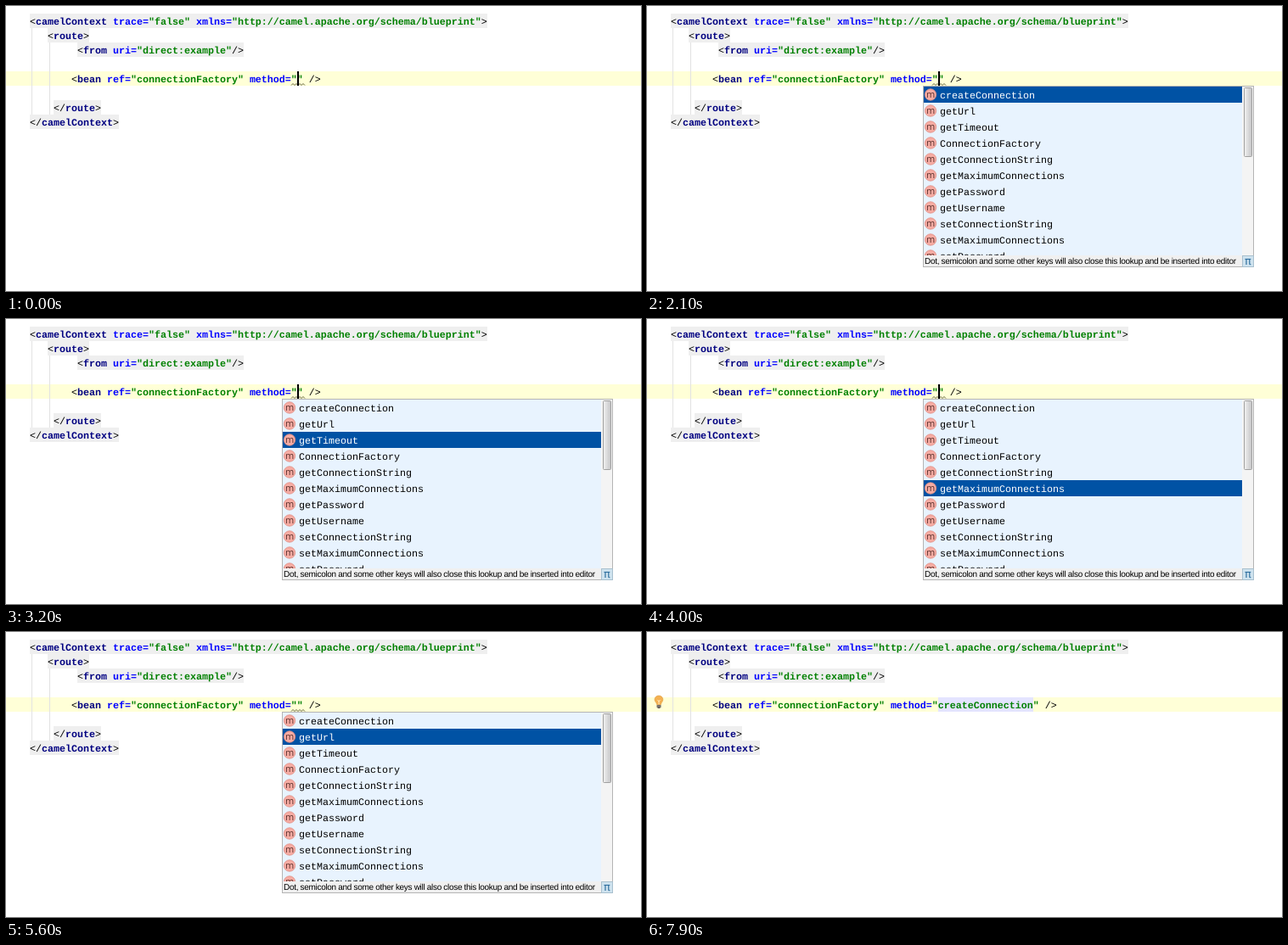
Recreate the animation shown at these times as an HTML page. Size 748 px wide and 336 px high, loop 8000 ms.

```html
<!DOCTYPE html>
<html lang="en">
<head>
<meta charset="utf-8">
<title>Method completion</title>
<style>
  html, body { margin: 0; width: 100%; height: 100%; overflow: hidden; background: #fff; }
  svg { display: block; width: 748px; height: 336px; }
  text { white-space: pre; text-rendering: geometricPrecision; }
  .code { font: 11.667px "Liberation Mono", monospace; }
  .tag { font-weight: bold; fill: #000080; }
  .attr { font-weight: bold; fill: #0000ff; }
  .val { font-weight: bold; fill: #008000; }
  .icon { font: 11px "Open Sans", sans-serif; fill: #5a2f2c; text-anchor: middle; }
  .hint { font: 10px "Liberation Sans", sans-serif; letter-spacing: -.31px; }
  .pi { font: 13px "DejaVu Sans", sans-serif; fill: #2f6f9f; text-anchor: middle; }
</style>
</head>
<body>
<svg id="stage" viewBox="0 0 748 336">
  <defs>
    <clipPath id="listClip"><rect x="326" y="95" width="375" height="199"/></clipPath>
    <linearGradient id="thumb"><stop stop-color="#f2f2f2"/><stop offset="1" stop-color="#c4c4c6"/></linearGradient>
  </defs>
</svg>
<script>
const LOOP = 8000, CHAR = 7, LINE = 17, ROW = 19;
const stage = document.getElementById('stage');

function add(parent, name, attrs = {}, content) {
  const el = document.createElementNS('http://www.w3.org/2000/svg', name);
  for (const key in attrs) el.setAttribute(key, attrs[key]);
  if (content !== undefined) el.textContent = content;
  parent.appendChild(el);
  return el;
}
const rect = (parent, x, y, width, height, fill, more) =>
  add(parent, 'rect', { x, y, width, height, fill, ...more });
const show = (el, on) => el.setAttribute('visibility', on ? 'inherit' : 'hidden');

function tokenClass(token) {
  if (token[0] === '"') return 'val';
  if (token.endsWith('=')) return 'attr';
  return /\w/.test(token) ? 'tag' : '';
}
function codeText(parent, x, row, source) {
  const text = add(parent, 'text', { class: 'code', x, y: 22 + LINE * row });
  for (const token of source.match(/"[^"]*"|\w+=|\w+|[^\w"]+/g))
    add(text, 'tspan', { class: tokenClass(token) }, token);
  return text;
}

// Editor
rect(stage, 0, 77, 748, LINE, '#ffffd7');
rect(stage, 30, 26, 1, 103, '#e2e2e2');
rect(stage, 51, 43, 1, 85, '#e2e2e2');
const lines = [
  [28, 0, '<camelContext trace="false" xmlns="http://camel.apache.org/schema/blueprint">'],
  [49, 1, '<route>'],
  [84, 2, '<from uri="direct:example"/>'],
  [56, 6, '</route>'],
  [28, 7, '</camelContext>']
];
for (const [x, row, source] of lines) {
  rect(stage, x, 9 + LINE * row, source.length * CHAR, LINE, '#efefef');
  codeText(stage, x, row, source);
}
const usage = rect(stage, 343, 77, 112, LINE, '#e4e4ff');
const bean = name => codeText(stage, 77, 4, `<bean ref="connectionFactory" method="${name}" />`);
const emptyBean = bean(''), filledBean = bean('createConnection');
const wave = add(stage, 'path', {
  d: 'M336 93.5' + 'l2 -2l2 2'.repeat(4), fill: 'none', stroke: '#66663c', 'stroke-width': 1
});
const caret = rect(stage, 343, 77, 2, LINE, '#000');

// Intention bulb
const bulb = add(stage, 'g');
add(bulb, 'path', {
  d: 'M11.5 85.5C11.5 83 9 82.500 9 79.500A4.900 4.500 0 0 1 18.800 79.500C18.800 82.500 16.500 83 16.500 85.500Z',
  fill: '#f4b152', stroke: '#dd9a3c', 'stroke-width': .6
});
add(bulb, 'path', { d: 'M12.500 80l1.500 2l1.500 -2M14 82v3', fill: 'none', stroke: '#fff0cc', 'stroke-width': .9 });
rect(bulb, 11.5, 86, 5, 3, '#77706a');
rect(bulb, 12.5, 89, 3, 1, '#55504c');

// Completion popup
const popup = add(stage, 'g');
rect(popup, 325.5, 94.5, 389, 213, '#f0f0f0', { stroke: '#b4b4b4' });
const list = add(popup, 'g', { 'clip-path': 'url(#listClip)' });
rect(list, 326, 95, 375, 199, '#e8f3fe');
const bar = rect(list, 326, 95, 375, ROW, '#0052a4');
const names = ['createConnection', 'getUrl', 'getTimeout', 'ConnectionFactory', 'getConnectionString',
  'getMaximumConnections', 'getPassword', 'getUsername', 'setConnectionString',
  'setMaximumConnections', 'setPassword'];
const items = names.map((name, i) => {
  const y = 104.5 + ROW * i;
  add(list, 'circle', { cx: 334, cy: y, r: 6.7, fill: '#f6aca3', stroke: '#e08d85', 'stroke-width': .8 });
  add(list, 'text', { class: 'icon', x: 334, y: y + 3.2 }, 'm');
  return add(list, 'text', { class: 'code', x: 345, y: y + 4.5 }, name);
});
rect(popup, 701, 95, 13, 199, '#f4f4f4');
rect(popup, 703.5, 96.5, 9, 81, 'url(#thumb)', { rx: 1, stroke: '#a0a0a0' });
add(popup, 'text', { class: 'hint', x: 327, y: 304 },
  'Dot, semicolon and some other keys will also close this lookup and be inserted into editor');
rect(popup, 701.5, 294.5, 13, 13, '#cfe3ef', { stroke: '#a9c0ce' });
add(popup, 'text', { class: 'pi', x: 708, y: 305 }, 'π');

// Timeline
const blinks = [500, 1000, 1700, 2100, 2500, 3000, 3500, 4000, 4500, 5000, 5600, 6000,
  6500, 6500, 7100, 7600, 7900];
const downs = [2700, 3000, 3400, 3700, 3800];
const ups = [4700, 5000, 5300, 5600, 5800];
const passed = (times, t) => times.filter(at => t >= at).length;

function draw(t) {
  const filled = t >= 6500;
  const selected = passed(downs, t) - passed(ups, t);
  show(popup, t >= 2100 && t < 6400);
  bar.setAttribute('y', 95 + ROW * selected);
  items.forEach((item, i) => item.setAttribute('fill', i === selected ? '#fff' : '#000'));
  show(emptyBean, !filled);
  show(wave, !filled);
  show(filledBean, filled);
  show(usage, t >= 7300);
  show(bulb, t >= 7600);
  caret.setAttribute('x', filled ? 455 : 343);
  show(caret, passed(blinks, t) % 2 === 0);
}

const start = performance.now();
function tick() {
  draw((performance.now() - start) % LOOP);
  requestAnimationFrame(tick);
}
draw(0);
requestAnimationFrame(tick);
</script>
</body>
</html>
```
